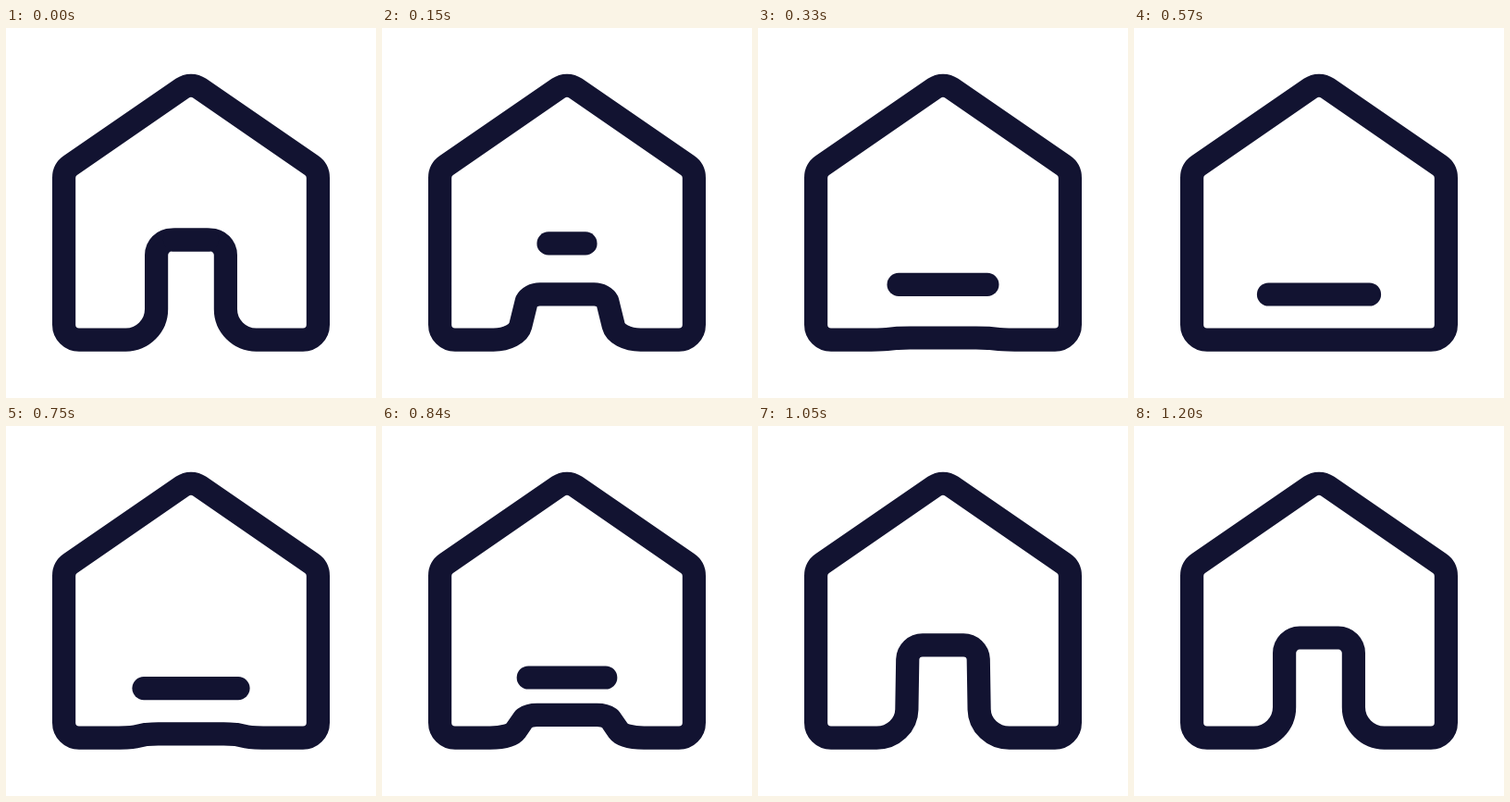
Animation of 400 by 400 pixels, one loop 3.23 s. Source, as an HTML page:

```html
<!DOCTYPE html>
<html lang="en">
<head>
<meta charset="utf-8">
<title>Home</title>
<style>
  html, body { margin: 0; width: 100%; height: 100%; overflow: hidden; background: #fff; }
  svg { display: block; width: 100%; height: 100%; }
  path { fill: none; stroke: #121331; stroke-width: 25.2; stroke-linecap: round; stroke-linejoin: round; }
</style>
</head>
<body>
<svg viewBox="0 0 400 400">
  <path id="house"/>
  <path id="bar"/>
</svg>
<script>
const LOOP = 3230, STEP = 30, LAST = 1200;
const house = document.getElementById('house');
const bar = document.getElementById('bar');

// Left half of the doorway, from the foot up to the lintel: [x, y, x when flat]
const FLOOR = 337.1;
const DOOR = [
  [129.5, FLOOR, 113], [147.7, FLOOR, 126], [162.6, 322.2, 135], [162.6, 304, 139],
  [162.6, 245.5, 151],
  [162.6, 236.4, 155], [170, 229, 159], [179, 229, 164]
];

// Bar poses: height and half length
const LINTEL = [229, 17.5], LOW = [288, 54.5], MERGED = [256, 29];

const lerp = (a, b, k) => a + (b - a) * k;

// Cubic easing with control points (a, 0) and (b, 1)
function ease(x, a, b) {
  if (x <= 0) return 0;
  if (x >= 1) return 1;
  let lo = 0, hi = 1, s = 0.5;
  for (let i = 0; i < 24; i++) {
    s = (lo + hi) / 2;
    const v = 3 * s * (1 - s) * (1 - s) * a + 3 * s * s * (1 - s) * b + s * s * s;
    if (v < x) lo = s; else hi = s;
  }
  return s * s * (3 - 2 * s);
}

const span = (t, start, length, a, b) => ease((t - start) / length, a, b);
const fmt = p => p[0].toFixed(2) + ' ' + p[1].toFixed(2);

function housePath(flat) {
  const l = DOOR.map(([x, y, fx]) => [lerp(x, fx, flat), lerp(y, FLOOR, flat)]);
  const r = l.map(([x, y]) => [400 - x, y]).reverse();
  const curve = (p, i) => `C${fmt(p[i])} ${fmt(p[i + 1])} ${fmt(p[i + 2])}`;
  return `M${fmt(l[0])}${curve(l, 1)}L${fmt(l[4])}${curve(l, 5)}` +
    `L${fmt(r[0])}${curve(r, 1)}L${fmt(r[4])}${curve(r, 5)}` +
    `L321 ${FLOOR}A16.4 16.4 0 0 0 337.4 320.7L337.4 162` +
    'A16.4 16.4 0 0 0 330.3 148.5L209.3 65.2A16.4 16.4 0 0 0 190.7 65.2' +
    `L69.7 148.5A16.4 16.4 0 0 0 62.6 162L62.6 320.7A16.4 16.4 0 0 0 79 ${FLOOR}Z`;
}

function draw(t) {
  const closing = t < 600;
  const flat = closing
    ? span(t, 0, 420, 0.57, 0.02)
    : 1 - span(t, 660, 540, 0.55, 0.3);
  house.setAttribute('d', housePath(flat));

  const drop = closing
    ? span(t, 60, 480, 0.506, 0.214)
    : 1 - span(t, 660, 300, 0.45, 0.817);
  const from = closing ? LINTEL : MERGED;
  const [y, half] = from.map((v, i) => lerp(v, LOW[i], drop));
  bar.setAttribute('d', `M${fmt([200 - half, y])}L${fmt([200 + half, y])}`);
  bar.style.display = t >= 960 ? 'none' : '';
}

const begin = performance.now();
function tick() {
  const t = (performance.now() - begin) % LOOP;
  draw(Math.min(LAST, Math.floor(t / STEP) * STEP));
  requestAnimationFrame(tick);
}
tick();
</script>
</body>
</html>
```
